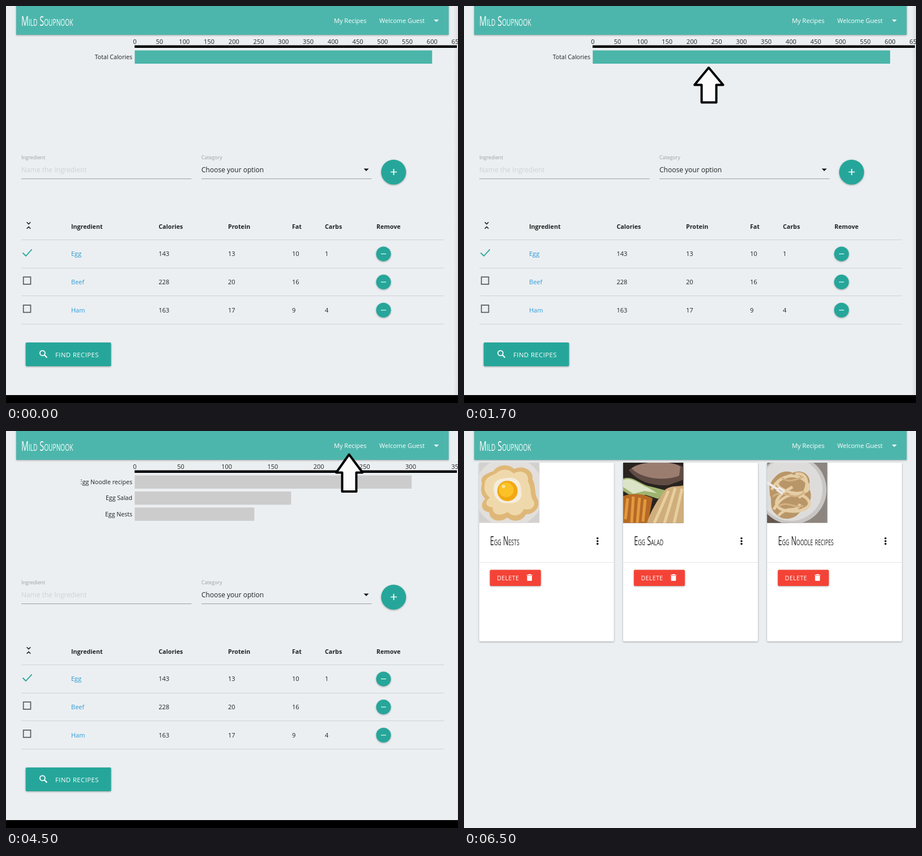
An HTML page that plays this animation: 798x702 px, repeating every 8000 ms.

```html
<!DOCTYPE html>
<html lang="en">
<head>
<meta charset="utf-8">
<title>Recipe cupboard</title>
<style>
  html, body { margin: 0; width: 100%; height: 100%; overflow: hidden; background: #ebeff2; }
  svg { display: block; width: 798px; height: 702px; }
  text { font-family: "Open Sans", "Noto Sans", sans-serif; font-size: 11px; fill: #212121; }
  .hand { font-variant: small-caps; }
  .bold { font-weight: 700; font-size: 10.7px; }
  .small { font-size: 8.8px; fill: #9e9e9e; }
  .field { font-size: 12px; }
  .upper { letter-spacing: .45px; fill: #fff; }
  .lift { filter: drop-shadow(0 1.5px 1.5px rgba(0, 0, 0, .32)); }
</style>
</head>
<body>
<svg id="stage" viewBox="0 0 798 702">
  <defs>
    <linearGradient id="edge"><stop offset="0" stop-color="#ebeff2"/><stop offset="1" stop-color="#d9dde0"/></linearGradient>
    <clipPath id="chartClip"><rect x="132" y="52" width="666" height="140"/></clipPath>
    <clipPath id="photoClip"><rect width="106.5" height="106.5"/></clipPath>
  </defs>
  <rect width="798" height="702" fill="#ebeff2"/>
  <g id="pantry"></g>
  <g id="saved"></g>
  <g id="nav"></g>
  <g id="arrows" fill="#fcfcfc" stroke="#000" stroke-width="4" stroke-linejoin="round">
    <path id="arrowUp" d="M432 109L457.5 139.5H445.5V170.5H419.5V139.5H407Z"/>
    <path id="arrowNav" d="M605.7 41.5L629.5 73.5H618.5V107H593.5V73.5H583Z"/>
  </g>
</svg>
<script>
const TEAL = '#26a69a', LIGHT = '#4db6ac', LOOP = 8000;
const $ = id => document.getElementById(id);

const attrs = o => Object.entries(o).map(([k, v]) => ` ${k}="${v}"`).join('');
const text = (x, y, s, o = {}) => `<text x="${x}" y="${y}"${attrs(o)}>${s}</text>`;
const rect = (x, y, w, h, fill, o = {}) =>
  `<rect x="${x}" y="${y}" width="${w}" height="${h}" fill="${fill}"${attrs(o)}/>`;
const circle = (x, y, r, fill, o = {}) => `<circle cx="${x}" cy="${y}" r="${r}" fill="${fill}"${attrs(o)}/>`;
const line = (d, stroke, width = 1, o = {}) =>
  `<path d="${d}" fill="none" stroke="${stroke}" stroke-width="${width}"${attrs(o)}/>`;
const shape = (d, fill) => `<path d="${d}" fill="${fill}"/>`;

// Narrow display lettering shared by the brand and the card titles
const hand = (x, y, s, size, fill) =>
  `<g transform="translate(${x} ${y}) scale(.6 1)">` +
  `<text class="hand" style="font-size:${size}px;fill:${fill}">${s}</text></g>`;

function nav() {
  const white = { style: 'fill:#fff' };
  return rect(18, -6, 763.5, 57, LIGHT, { class: 'lift' }) +
    hand(27, 35, 'Mild Soupnook', 24, '#fff') +
    text(579, 30, 'My Recipes', white) + text(659, 30, 'Welcome Guest', white) +
    shape('M755.5 24H764L759.8 28.3Z', '#fff');
}

function chart(id, perTick, ticks, bars, fill) {
  let out = '';
  for (let i = 0; i <= ticks; i++)
    out += text(227.3 + i * perTick, 67, i * 50, { 'text-anchor': 'middle' });
  out += rect(227, 69.5, 569, 4.5, '#000');
  bars.forEach(([name, value], i) => {
    const y = 78.5 + i * 28.4;
    out += rect(227.3, y, value * perTick / 50, 23.5, fill) +
      text(223, y + 15.5, name, { 'text-anchor': 'end', style: 'font-size:10.6px' });
  });
  return `<g id="${id}" clip-path="url(#chartClip)">${out}</g>`;
}

function form() {
  return text(27, 271, 'Ingredient', { class: 'small' }) +
    text(27, 294, 'Name the Ingredient', { class: 'field', style: 'fill:#d0d2d4' }) +
    text(345, 271, 'Category', { class: 'small' }) +
    text(345, 294, 'Choose your option', { class: 'field' }) +
    line('M27 305.5H327.5M345 305.5H645.5', '#9e9e9e') +
    shape('M631.5 287.5H640.5L636 292Z', '#111') +
    circle(684.3, 293.8, 22, TEAL, { class: 'lift' }) +
    line('M679 293.5H690M684.5 288V299', '#fff', 1.7);
}

function table() {
  const cols = [115, 269.5, 392, 505, 563, 654];
  const rows = [['Egg', 143, 13, 10, 1], ['Beef', 228, 20, 16, ''], ['Ham', 163, 17, 9, 4]];
  let out = line('M36.7 382.2L40 385.5L43.3 382.2M36.7 393.8L40 390.5L43.3 393.8', '#222', 1.6) +
    line('M27 413.5H773', '#d0d3d5');
  ['Ingredient', 'Calories', 'Protein', 'Fat', 'Carbs', 'Remove'].forEach((s, i) => {
    out += text(cols[i], 394, s, { class: 'bold' });
  });
  rows.forEach((row, r) => {
    const y = 438.4 + r * 49.7;
    row.forEach((s, i) => {
      out += text(cols[i], y + 4, s, i ? {} : { style: 'fill:#2a9bd6' });
    });
    out += r ? rect(30.7, y - 8.9, 12.8, 12.8, 'none', { stroke: '#5a5a5a', 'stroke-width': 1.7 })
      : line('M29.5 436.5L35 442L45.7 430.3', TEAL, 1.8);
    out += circle(666.5, y, 13, TEAL, { class: 'lift' }) +
      line(`M662 ${y}h9`, '#fff', 1.1) + line(`M27 ${Math.round(y + 24.3) + .5}H773`, '#d0d3d5');
  });
  return out;
}

function findButton() {
  return rect(34.7, 595, 150.8, 42, TEAL, { rx: 2, class: 'lift' }) +
    circle(64.4, 613.8, 4.5, 'none', { stroke: '#fff', 'stroke-width': 1.8 }) +
    line('M67.7 617.1L72.4 621.8', '#fff', 2.1) +
    text(87, 620.5, 'FIND RECIPES', { class: 'upper', style: 'font-size:11.3px' });
}

const photos = [
  rect(0, 0, 107, 107, '#d3d1cf') + circle(53, 52, 62, '#e2dfdc') +
    shape('M5 37C0 24 14 19 25 15C35 1 54 3 62 11C79 3 97 15 94 29C101 42 97 56 104 66C108 82 94 92 83 91C74 107 57 104 50 97C35 108 18 101 18 88C2 85 2 72 11 64C3 56 2 47 5 37Z', '#dfb878') +
    shape('M10 39C10 25 22 24 31 18C42 9 54 12 61 19C77 10 89 21 86 33C94 47 88 57 97 69C100 80 89 85 79 82C72 97 58 95 50 87C37 96 23 92 24 79C10 78 10 68 19 62C10 54 8 46 10 39Z', '#efd9ac') +
    shape('M26 43C28 27 43 28 52 27C68 25 75 38 74 49C79 65 64 74 51 71C36 74 24 61 26 43Z', '#f5eddd') +
    circle(50, 50, 18, '#f2a813') + circle(48, 48, 13, '#fac227') + circle(43, 42, 3, '#fde391'),
  rect(0, 0, 107, 107, '#292320') +
    shape('M0 28C18 22 30 39 48 42L75 49L62 64L40 57L20 62L0 50Z', '#9fb46f') +
    shape('M0 31C15 24 27 38 44 44L60 54L38 50L18 55L0 43Z', '#dce4c7') +
    shape('M10 13C25 0 80-8 107 8V30L79 40C50 41 25 33 10 13Z', '#604c44') +
    shape('M15 10C29-3 83-5 101 7L99 23C75 33 32 29 15 10Z', '#9b7d70') +
    shape('M0 59C17 53 37 55 52 63L44 107H0Z', '#b66a25') +
    line('M8 63L4 100M18 60L15 106M29 62L25 107M39 65L35 104', '#e39a3f', 5) +
    shape('M75 47C88 39 99 43 107 40V107H42C48 87 60 66 75 47Z', '#cfae7c') +
    line('M80 50L55 107M92 45L73 107M104 46L90 107', '#e8cf9f', 5),
  rect(0, 0, 107, 107, '#8d857f') + shape('M0 55L37 107H0Z', '#63574e') +
    circle(44, 48, 61, '#c8c6c4') + circle(42, 47, 56, '#dedcda') +
    shape('M4 42C11 23 28 10 45 18C66 9 81 27 73 43C83 61 75 77 61 81C54 102 26 104 16 91C2 81 10 64 5 58Z', '#b99668') +
    line('M8 48C23 18 56 18 70 35S55 60 31 49S20 28 45 22M12 83C28 50 64 51 73 67S48 91 27 83S18 57 45 43M20 94C36 74 52 91 58 73M50 20C74 15 77 47 56 62', '#e5cda5', 5) +
    line('M10 60C29 43 49 73 66 51M20 77C36 66 50 83 64 76M26 27C39 37 52 29 64 25', '#d2b283', 3) +
    line('M0 35L20 48M17 48L28 55M20 44L31 51', '#edebea', 4)
];

function card(title, i) {
  const x = 26.7 + i * 254.2;
  const dots = [189.8, 194.7, 199.6].map(y => circle(209, y, 1.8, '#111')).join('');
  return `<g transform="translate(${x} 0)">` +
    rect(0, 56, 238, 316, '#fff', { rx: 2, class: 'lift' }) +
    `<g transform="translate(0 56)" clip-path="url(#photoClip)">${photos[i]}</g>` +
    hand(19.3, 202, title, 21, '#222') + dots + line('M0 232.5H238', '#e6e6e6') +
    rect(19, 245.5, 90, 28.5, '#f44336', { rx: 2, class: 'lift' }) +
    text(31.5, 263.7, 'DELETE', { class: 'upper', style: 'font-size:10.5px' }) +
    shape('M84.7 256H93.3V263.7Q93.3 265 92 265H86Q84.7 265 84.7 263.7ZM84 253.9H86.6L87.3 253.1H90.7L91.4 253.9H94V255.3H84Z', '#fff') +
    '</g>';
}

$('nav').innerHTML = nav();
$('pantry').innerHTML =
  rect(790, 0, 8, 688, 'url(#edge)', { id: 'shade' }) + rect(797, 52, 1, 636, '#d9dde0') +
  chart('total', 43.75, 13, [['Total Calories', 600]], '#4bb5aa') +
  chart('recipes', 81.2, 7, [['Egg Noodle recipes', 301], ['Egg Salad', 170], ['Egg Nests', 130]], '#ccc') +
  form() + table() + findButton() + rect(0, 688, 798, 14, '#000');
$('saved').innerHTML = ['Egg Nests', 'Egg Salad', 'Egg Noodle recipes'].map(card).join('');

const show = (id, on) => { $(id).style.display = on ? '' : 'none'; };

function draw(t) {
  const during = (from, to) => t >= from && t < to;
  show('pantry', t < 6500);
  show('saved', t >= 6500);
  show('total', t < 2500);
  show('shade', t < 2500);
  show('recipes', t >= 2500);
  show('arrowUp', during(500, 2500));
  show('arrowNav', during(4500, 6500));
}

function tick() {
  draw(performance.now() % LOOP);
  requestAnimationFrame(tick);
}
tick();
</script>
</body>
</html>
```
